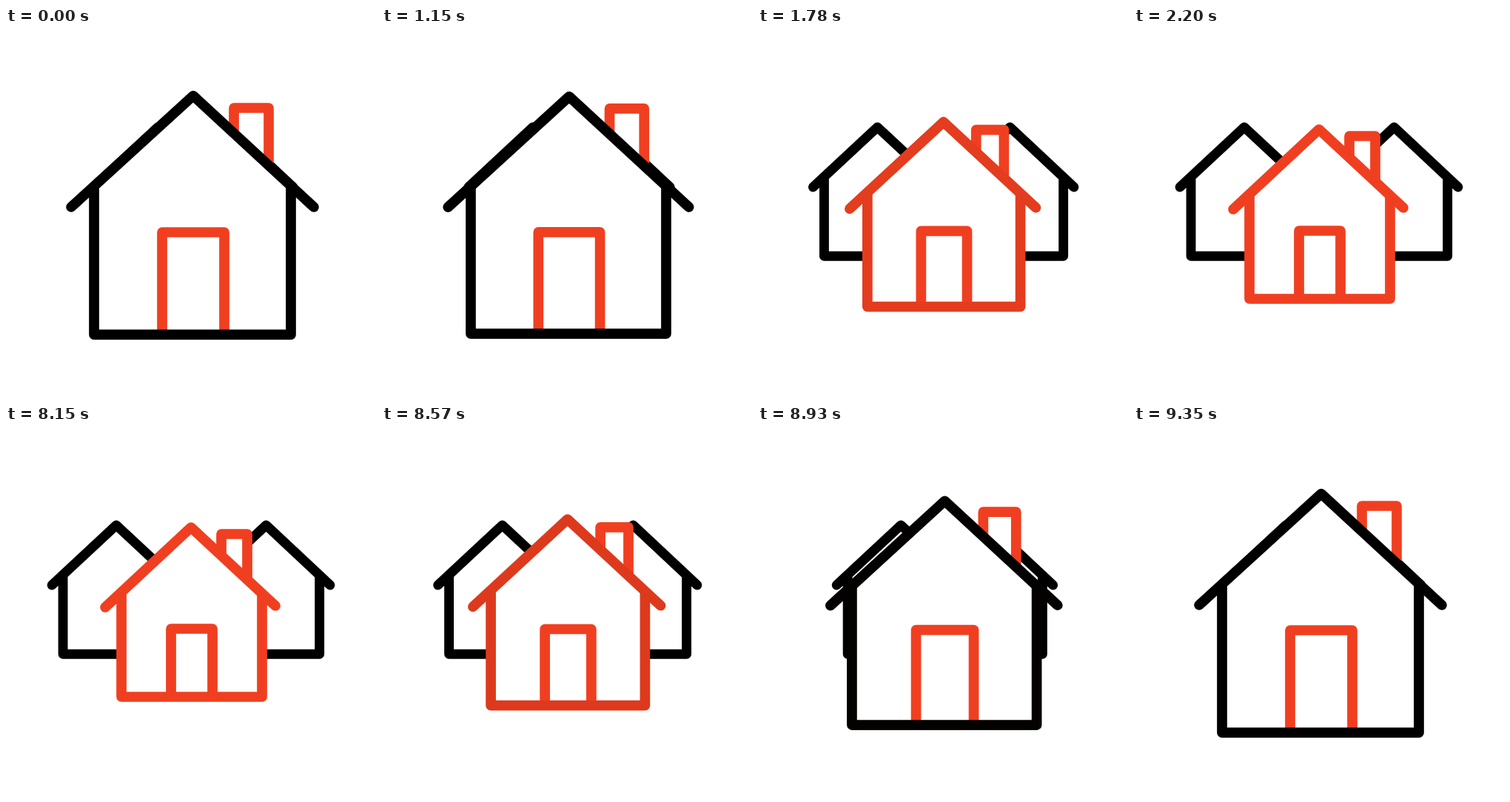
Animation of 500 by 500 pixels, one loop 9.38 s. Source, as an HTML page:

```html
<!DOCTYPE html>
<html lang="en">
<head>
<meta charset="utf-8">
<title>House to neighbourhood</title>
<style>
  html, body { margin: 0; width: 100%; height: 100%; overflow: hidden; background: #fff; }
  svg { display: block; width: 100%; height: 100%; }
  path { fill: none; stroke: #000; stroke-width: 13.7; stroke-linejoin: round; }
  .side { stroke-width: 12.9; stroke-linecap: round; }
  .red { stroke: #f03f20; }
  .body, .chimney { fill: #fff; }
  .body { stroke: none; }
  .roof { stroke-linecap: round; }
</style>
</head>
<body>
<svg viewBox="0 0 500 500">
  <path id="left" class="side" d="M62 215L149 134L236 215M77 203V308.2H221V203"></path>
  <path id="right" class="side" d="M265 215L351.5 134L438 215M279 203V308.2H423.7V203"></path>
  <path id="chimney" class="chimney red"></path>
  <path id="fill" class="body"></path>
  <path id="door" class="red"></path>
  <path id="walls"></path>
  <path id="roof" class="roof"></path>
</svg>
<script>
const LOOP = 9380, DURATION = 1200, OUT = 995, BACK = 8140;
const RED = [240, 63, 32];

// Each value: [large single house, small front house]
const shape = {
  apexX: [253, 250], apexY: [91.5, 137],
  eaveL: [88, 134], eaveLY: [242, 245],
  eaveR: [416, 364], eaveRY: [242, 243],
  wallL: [119, 156], wallR: [385, 346], base: [414.4, 366],
  doorL: [211, 223], doorR: [295, 279], doorY: [276, 274],
  chimL: [308, 291], chimR: [355, 326], chimY: [108, 146]
};

const el = id => document.getElementById(id);
const clamp = x => Math.min(1, Math.max(0, x));
const smooth = x => x * x * (3 - 2 * x);
const draw = (id, d) => el(id).setAttribute("d", d);

// cubic-bezier(.5, 0, .5, 1)
function ease(x) {
  let lo = 0, hi = 1;
  for (let i = 0; i < 24; i++) {
    const s = (lo + hi) / 2;
    if (1.5 * s * (1 - s) + s ** 3 < x) lo = s; else hi = s;
  }
  return smooth((lo + hi) / 2);
}

function render(t) {
  const u = clamp((t - OUT) / DURATION) - clamp((t - BACK) / DURATION);
  const p = ease(u);
  const h = {};
  for (const k in shape) h[k] = shape[k][0] + (shape[k][1] - shape[k][0]) * p;

  const slopeL = (h.eaveLY - h.apexY) / (h.apexX - h.eaveL);
  const slopeR = (h.eaveRY - h.apexY) / (h.eaveR - h.apexX);
  const roofY = x => h.apexY + (x < h.apexX ? (h.apexX - x) * slopeL : (x - h.apexX) * slopeR);
  const walls = `M${h.wallL} ${roofY(h.wallL)}V${h.base}H${h.wallR}V${roofY(h.wallR)}`;

  draw("chimney", `M${h.chimL} ${roofY(h.chimL)}V${h.chimY}H${h.chimR}V${roofY(h.chimR)}`);
  draw("fill", `${walls}L${h.apexX} ${h.apexY}Z`);
  draw("door", `M${h.doorL} ${h.base}V${h.doorY}H${h.doorR}V${h.base}`);
  draw("walls", walls);
  draw("roof", `M${h.eaveL} ${h.eaveLY}L${h.apexX} ${h.apexY}L${h.eaveR} ${h.eaveRY}`);

  const tint = smooth(clamp((u - 0.31) / 0.4));
  const color = `rgb(${RED.map(c => Math.round(c * tint))})`;
  el("walls").style.stroke = el("roof").style.stroke = color;

  el("left").setAttribute("transform", `translate(${56.2 * (1 - p)} 0)`);
  el("right").setAttribute("transform", `translate(${-50 * (1 - p)} 0)`);
}

const start = performance.now();
function tick() {
  render((performance.now() - start) % LOOP);
  requestAnimationFrame(tick);
}
tick();
</script>
</body>
</html>
```
